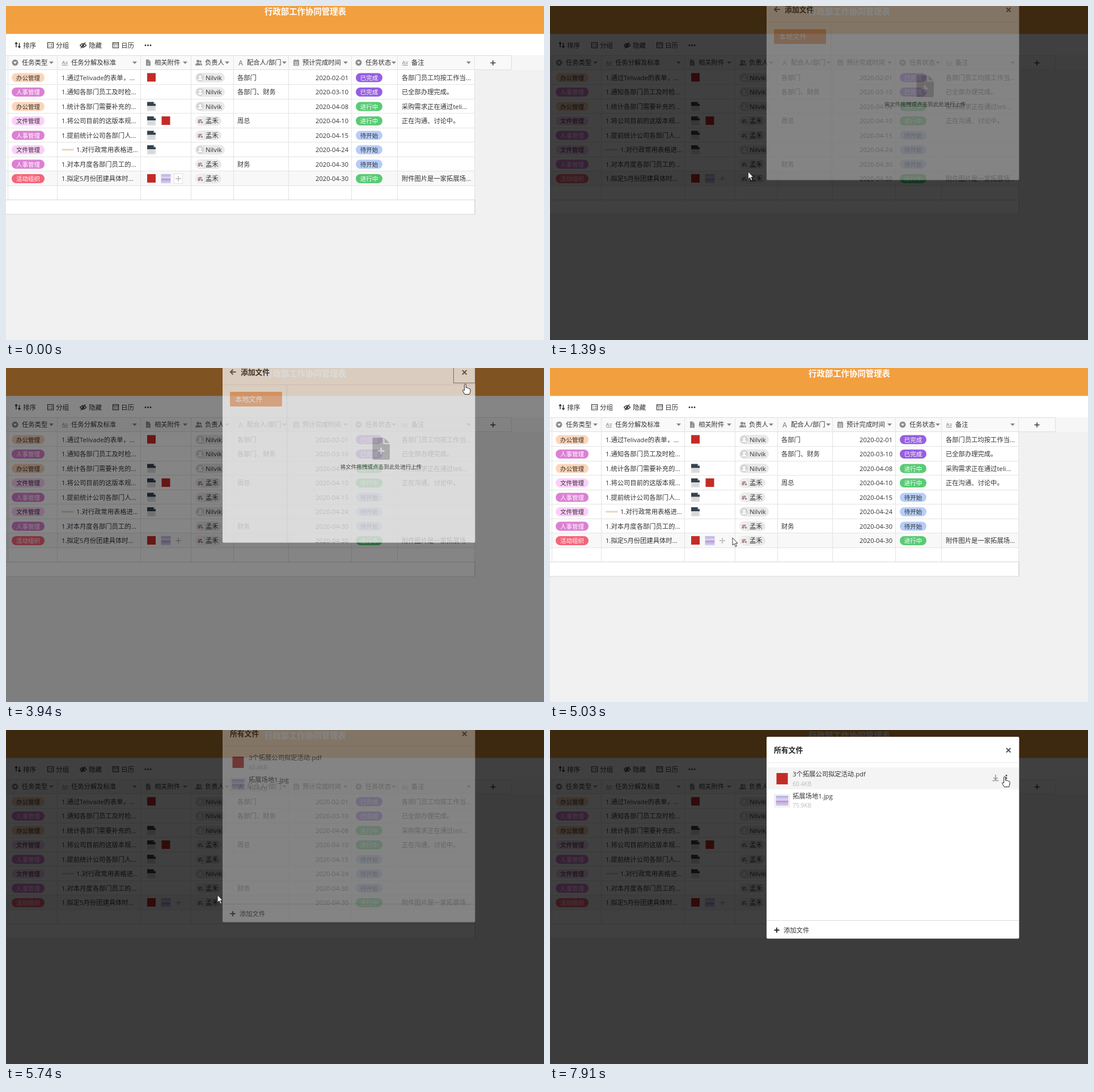
An HTML page that plays this animation: 949x590 px, repeating every 8000 ms.

```html
<!DOCTYPE html>
<html lang="zh-CN">
<head>
<meta charset="utf-8">
<title>行政部工作协同管理表</title>
<style>
html, body { margin: 0; width: 100%; height: 100%; overflow: hidden; background: #f1f1f1; }
svg { display: block; width: 100vw; height: 100vh; }
text { font-family: "Open Sans", "Noto Sans CJK SC", "Noto Sans CJK JP", "Noto Sans CJK", sans-serif; white-space: pre; }
</style>
</head>
<body>
<svg id="stage" viewBox="0 0 949 590" xmlns="http://www.w3.org/2000/svg">
  <defs>
    <linearGradient id="sky" x2="0" y2="1">
      <stop offset="0" stop-color="#a9b0e2"/><stop offset=".4" stop-color="#e3d3ee"/>
      <stop offset=".6" stop-color="#c3a8dc"/><stop offset="1" stop-color="#cfd2f4"/>
    </linearGradient>
  </defs>
  <g id="page"></g>
  <rect id="dim" width="949" height="590"/>
  <g id="upload"></g>
  <g id="files"></g>
  <path id="arrow" d="M0 0V13L3 10.3L5.2 15.6L7.4 14.6L5.2 9.6H9Z" fill="#fff" stroke="#222" stroke-width=".9"/>
  <path id="hand" d="M-1.4 1.2Q0 -.8 1.4 1.2V7Q3.4 5.8 4.2 7.6Q6 6.8 6.8 8.5Q8.8 8 9 10V14L7.5 18.5H-.8L-4.2 12.6Q-5 9.8-1.4 11.6Z" fill="#fff" stroke="#222"/>
</svg>
<script>
const $ = id => document.getElementById(id);
const rect = (x, y, w, h, fill, more = '') =>
  `<rect x="${x}" y="${y}" width="${w}" height="${h}" fill="${fill}" ${more}/>`;
const text = (x, y, s, size = 11.3, fill = '#333', more = '') =>
  `<text x="${x}" y="${y}" font-size="${size}" fill="${fill}" ${more}>${s}</text>`;
const line = (d, color = '#e3e3e3', width = 1) =>
  `<path d="${d}" fill="none" stroke="${color}" stroke-width="${width}"/>`;
const shape = (d, fill) => `<path d="${d}" fill="${fill}"/>`;
const disc = (x, y, r, fill) => `<circle cx="${x}" cy="${y}" r="${r}" fill="${fill}"/>`;
const at = (x, y, s) => `<g transform="translate(${x} ${y})">${s}</g>`;
const pill = (x, y, w, fill, s, color) =>
  rect(x, y - 8, w, 16, fill, 'rx="8"') + text(x + w / 2, y + 4, s, 10.5, color, 'text-anchor="middle"');

// Small icons, centred on 0,0
const GREY = '#8c8c8c';
const icons = {
  select: disc(0, 0, 5.5, GREY) + shape('M-3 -1.5H3L0 2.5Z', '#fff'),
  long: text(-5.5, 2.5, 'A', 9, GREY, 'font-weight="600"') + line('M1 -1H5M1 1.5H5M-5 4.5H5', GREY),
  file: shape('M-4 -5.5H1L4 -2.5V5.5H-4Z', GREY) + line('M1 -5.5V-2.5H4M-2 1H2M-2 3H2', '#ddd', .7),
  users: disc(-1.5, -2.5, 2.5, GREY) + shape('M-6 5Q-6 .5 -1.5 .5T3 5Z', GREY) +
    disc(3, -2, 1.9, GREY) + shape('M3.6 5Q3.6 2 2.4 .6Q6 .6 6 5Z', GREY),
  letter: text(-4, 4.5, 'A', 12, GREY, 'font-weight="600"'),
  date: rect(-5, -4.5, 10, 10, GREY, 'rx="1"') + line('M-2.5 -6V-3M2.5 -6V-3', GREY, 1.4) +
    line('M-4 -1.5H4M-4 1H4M-4 3.5H4M-1.5 -1.5V5M1.5 -1.5V5', '#f5f5f5', .7),
  doc: shape('M-7.5 -8H4L7.5 -4.5V8H-7.5Z', '#dedede') + shape('M-7.5 -8H4L7.5 -4.5V-1H-7.5Z', '#34414e') +
    shape('M4 -8V-4.5H7.5Z', '#cfd6dc') + line('M-5 2H5M-5 4.5H5', '#cacaca', .8),
  pdf: rect(-7.5, -8, 15, 15, '#c42b26'),
  photo: rect(-8.5, -8, 17, 16, 'url(#sky)', 'stroke="#e2e2e8" stroke-width=".7"') + line('M-8 1H8', '#9a86c6', 1),
  plus: line('M-5 0H5M0 -5V5', '#b5b5b5', 1.5)
};
const icon = (name, x, y) => at(x, y, icons[name]);

const tags = {
  办公管理: ['#fcd5b9', '#333'], 人事管理: ['#dc80d3', '#fff'], 文件管理: ['#fccff9', '#333'], 活动组织: ['#f4657a', '#fff'],
  已完成: ['#965fe2', '#fff'], 进行中: ['#59cb74', '#fff'], 待开始: ['#b7cdf8', '#333']
};
const edges = [4, 91, 238, 327, 402, 499, 610, 691, 827];
const heads = [ // icon, icon x, label x, label, arrow x
  ['select', 16, 28, '任务类型', 80], ['long', 104, 115, '任务分解及标准', 227], ['file', 251, 262, '相关附件', 316],
  ['users', 340, 351, '负责人', 390], ['letter', 414, 425, '配合人/部门', 491], ['date', 512, 523, '预计完成时间', 599],
  ['select', 622, 634, '任务状态', 684], ['long', 704, 715, '备注', 816]
];
const A = 'Nilvik', B = '孟禾';
const rows = [ // type, task, attachments, owner, partner, date, state, note
  ['办公管理', '1.通过Telivade的表单，...', ['pdf'], A, '各部门', '02-01', '已完成', '各部门员工均按工作当...'],
  ['人事管理', '1.通知各部门员工及时检...', [], A, '各部门、财务', '03-10', '已完成', '已全部办理完成。'],
  ['办公管理', '1.统计各部门需要补充的...', ['doc'], A, '', '04-08', '进行中', '采购需求正在通过teli...'],
  ['文件管理', '1.将公司目前的这版本规...', ['doc', 'pdf'], B, '周总', '04-10', '进行中', '正在沟通、讨论中。'],
  ['人事管理', '1.提前统计公司各部门人...', ['doc'], B, '', '04-15', '待开始', ''],
  ['文件管理', '1.对行政常用表格进...', ['doc'], A, '', '04-24', '待开始', ''],
  ['人事管理', '1.对本月度各部门员工的...', [], B, '财务', '04-30', '待开始', ''],
  ['活动组织', '1.拟定5月份团建具体时...', ['pdf', 'photo'], B, '', '04-30', '进行中', '附件图片是一家拓展场...']
];

function owner(name, y) {
  const face = name === A
    ? disc(0, 0, 6.8, '#d4d4d4') + disc(0, -1.8, 2.2, '#fff') + shape('M-4 4.2Q-4 1 0 1T4 4.2Z', '#fff')
    : disc(0, 0, 6.8, '#f3f1ef') + shape('M-5 -1Q0 -5 4 -2L1 1Z', '#a5a09e') +
      disc(-2, 2, 2.3, '#c08486') + disc(3, 2.5, 1.8, '#8c8c8c');
  return rect(334, y - 8.5, name === A ? 52 : 46, 17, '#e9e9e9', 'rx="8.5"') + at(342.5, y, face) + text(352, y + 4, name);
}

function drawPage() {
  let s = rect(0, 0, 949, 590, '#f1f1f1') + rect(0, 0, 949, 49.5, '#f29f40') +
    text(528, 15, '行政部工作协同管理表', 14.4, '#fff', 'font-weight="700" text-anchor="middle"') +
    rect(0, 49.5, 949, 38, '#fff') + rect(0, 87, 949, 26, '#f6f6f6') + rect(0, 87, 891, 25.5, '#f9f9f9') +
    rect(0, 113, 827, 255, '#fff') + rect(0, 291.5, 827, 26, '#f8f8f8');

  [[30, '排序'], [88, '分组'], [146, '隐藏'], [203, '日历']].forEach(([x, label]) => s += text(x, 73.5, label, 11.6));
  s += line('M18 65V73M16 67L18 64.5L20 67M23.5 65V73M21.5 71L23.5 73.5L25.5 71', '#333', 1.5) +
    line('M73.5 64.5H83.5V74H73.5ZM75.5 67.5H77M78.5 67.5H82M75.5 71H77M78.5 71H82', '#333', 1.2) +
    line('M130.5 69.5Q136 63 141.5 69.5Q136 76 130.5 69.5M132 74.5L140 64.5', '#333', 1.4) + disc(136, 69.5, 2, '#333') +
    line('M188.5 64.5H198.5V74H188.5ZM188.5 67H198.5M191 69.5H193M195 69.5H196.5M191 72H193M195 72H196.5', '#333', 1.2) +
    [246, 250.5, 255].map(x => disc(x, 69.5, 1.4, '#333')).join('');

  s += line('M0 87.5H891.5V112.5H0', '#dedede');
  heads.forEach(([name, ix, x, label, ax]) => s += icon(name, ix, 100) + text(x, 104, label) +
    shape(`M${ax - 4} 98H${ax + 4}L${ax} 102.5Z`, '#888'));
  s += line('M854.5 100.5H863.5M859 96V105', '#333', 1.4);
  for (let i = 1; i < 10; i++) s += line(`M0 ${Math.round(112.5 + i * 25.55) + .5}H827`);
  edges.forEach(x => s += line(`M${x - .5} 87V${x > 800 ? 368 : 342}`));
  s += line('M0 342.5H827.5V368H0', '#d6d6d6');

  rows.forEach(([type, task, files, who, partner, day, state, note], i) => {
    const y = 126.5 + i * 25.5;
    const thumb = i === 5;
    s += pill(10, y, 58, tags[type][0], type, tags[type][1]) + text(thumb ? 124 : 98, y + 4, task);
    if (thumb) s += rect(98, y - 2, 22, 3.5, '#f4e6d8') + line(`M99 ${y}H119`, '#d9b48f', .8);
    files.forEach((f, k) => s += icon(f, 256.5 + k * 25.5, y));
    s += owner(who, y) + text(408, y + 4, partner) +
      text(604, y + 4, '2020-' + day, 11.1, '#333', 'text-anchor="end"') +
      pill(617, y, 47, tags[state][0], state, tags[state][1]) + text(698, y + 4, note);
  });
  s += rect(296.5, 296.5, 15, 17, '#fff', 'id="plusBox" stroke="#e2e2e2"') + icon('plus', 304, 305);
  $('page').innerHTML = s;
}

const panel = (h, title, x) => rect(382, 12, 445.5, h, '#fff', 'rx="2"') + line('M382 57.5H827', '#e9e9e9') +
  text(x, 39.5, title, 12.8, '#222', 'font-weight="700"') +
  line('M805 32L812.5 39.5M812.5 32L805 39.5', '#555', 1.9);

function drawModals() {
  $('upload').innerHTML = panel(324.5, '添加文件', 414) +
    line('M405.5 35H396.5M400.5 30.5L396 35L400.5 39.5', '#555', 2) +
    rect(395, 70, 92, 26, '#f3ad7b', 'rx="2"') + text(404, 87.5, '本地文件', 12.2, '#fff') +
    line('M495.5 57V336', '#e9e9e9') +
    '<path id="sheet" d="M648.5 151H665.5V162.5H677V188Q677 190 675 190H648.5Q646.5 190 646.5 188V153Q646.5 151 648.5 151ZM667.5 151.5L676.5 160.5H667.5Z"/>' +
    line('M655.5 174.5H667.5M661.5 168.5V180.5', '#fff', 2.4) +
    text(661.5, 206, '将文件拖拽或点击到此处进行上传', 9.6, '#333', 'text-anchor="middle"') +
    rect(789.5, 12.5, 38, 42, 'none', 'id="focus" stroke="#777"');

  $('files').innerHTML = panel(356.5, '所有文件', 395) +
    '<g id="hover">' + rect(383, 66, 444, 38.5, '#f4f4f4') +
    '<path id="load" d="M786 79V87M782.5 84L786 87.5L789.5 84M780.5 89.5H791.5" fill="none" stroke-width="1.6"/>' +
    '<g id="dots">' + [80.5, 85, 89.5].map(y => `<circle cx="805" cy="${y}" r="1.4"/>`).join('') + '</g></g>' +
    rect(399.5, 76, 20, 20, '#c42b26') +
    text(428, 82, '3个拓展公司拟定活动.pdf') + text(428, 99, '60.4KB', 10.2, '#bbb') +
    rect(396.5, 114, 26, 22, '#fff', 'stroke="#ddd"') + rect(398.5, 116, 22, 18, 'url(#sky)') +
    line('M398.5 126H420.5', '#9a86c6') +
    text(428, 120.5, '拓展场地1.jpg') + text(428, 137, '75.9KB', 10.2, '#bbb') +
    line('M382 336.5H827', '#dcdcdc') + line('M395.5 353.5H404.5M400 349V358', '#222', 1.8) + text(412, 357.5, '添加文件');
}

const path = [ // time, x, y of the pointer tip
  [70, 684, 546], [680, 304, 304], [850, 304, 304], [1000, 305, 305], [1320, 305, 305], [1930, 688, 199],
  [2240, 674, 177], [2550, 674, 177], [3090, 811, 29], [3480, 811, 29], [3560, 810, 28], [3960, 810, 28],
  [4570, 342, 309], [4640, 337, 306], [4820, 322, 300], [5600, 322, 300], [6130, 514, 268], [6360, 600, 200],
  [6820, 805, 86], [7200, 805, 86], [7520, 786, 88], [7600, 786, 88], [7910, 802, 82], [8000, 802, 82]
];
const ramp = (t, start, span) => Math.min(1, Math.max(0, (t - start) / span));
const show = (id, on) => $(id).setAttribute('visibility', on ? 'inherit' : 'hidden');

function pointer(t) {
  const i = Math.max(1, path.findIndex(p => p[0] > t));
  const [t0, x0, y0] = path[i - 1], [t1, x1, y1] = path[i];
  const k = ramp(t, t0, t1 - t0);
  return [x0 + (x1 - x0) * k, y0 + (y1 - y0) * k];
}

function place(id, opacity, lift) {
  show(id, opacity > 0);
  $(id).setAttribute('opacity', opacity);
  $(id).setAttribute('transform', `translate(0 ${Math.ceil(-50 * lift)})`);
}

function draw(t) {
  const [x, y] = pointer(t);
  const second = t >= 5000, open = second ? 5500 : 1150;
  const closing = !second && t >= 3790;
  const shade = ramp(t, open, 200) * (closing ? 1 - ramp(t, 3790, 417) : 1);
  $('dim').setAttribute('opacity', .75 * shade);

  const seen = closing ? 1 - ramp(t, 3790, 520) : ramp(t, open + 170, 200);
  const lift = closing ? 1 - (1 - ramp(t, 3790, 350)) ** 1.5 : (1 - ramp(t, open + 170, 300)) ** 2;
  place('upload', second ? 0 : seen, lift);
  place('files', second ? seen : 0, lift);

  const overDrop = t > 1750 && t < 2680;
  $('sheet').setAttribute('fill', overDrop ? '#ffa40d' : '#bbb');
  show('focus', closing);
  show('plusBox', t < 850);
  show('hover', t > 6640);
  const overLoad = t > 7400 && t < 7740;
  $('load').setAttribute('stroke', overLoad ? '#444' : '#999');
  $('dots').setAttribute('fill', overLoad ? '#999' : '#444');

  const hand = overDrop || (t > 3040 && t < 4000) || t > 6770;
  show('hand', hand);
  show('arrow', !hand && t >= 70);
  for (const id of ['hand', 'arrow']) $(id).setAttribute('transform', `translate(${x} ${y})`);
}

drawPage();
drawModals();
const start = performance.now();
function tick(now) {
  draw(Math.max(0, now - start) % 8000);
  requestAnimationFrame(tick);
}
tick(start);
</script>
</body>
</html>
```
